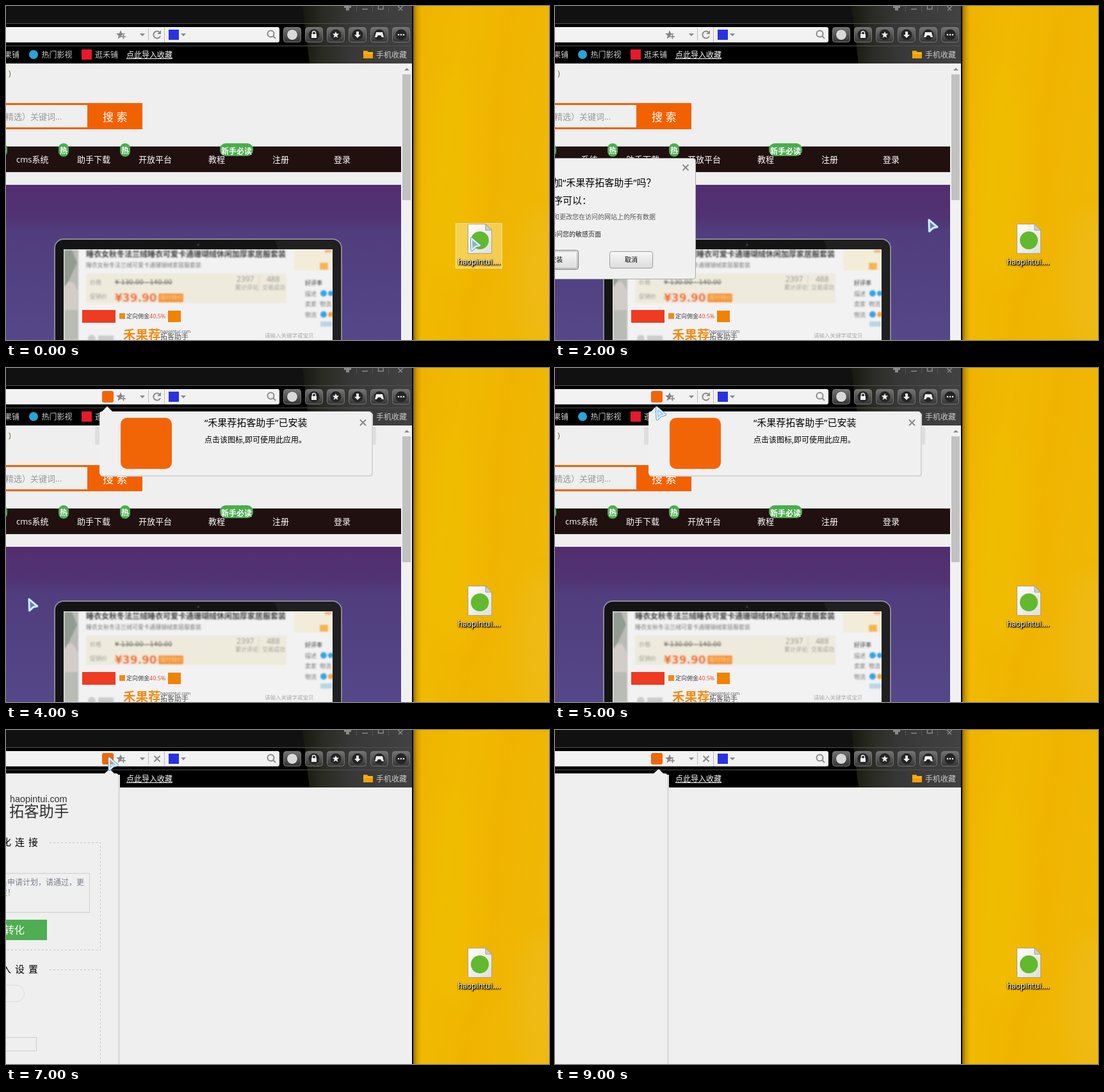
Recreate the animation shown at these times as an HTML page. Size 848 by 523 pixels, loop 10000 ms.

```html
<!DOCTYPE html>
<html lang="zh-CN">
<head>
<meta charset="utf-8">
<title>拖放安装扩展</title>
<style>
html, body { margin: 0; width: 100%; height: 100%; overflow: hidden; background: #f0b400; }
svg { display: block; font: 12px 'Open Sans', 'Noto Sans CJK SC', 'Noto Sans CJK', sans-serif; }
.line { fill: none; stroke: #8a8a8a; stroke-width: 2; }
.dash { fill: none; stroke: #c4c4c4; stroke-dasharray: 3 3; }
.t9 { font-size: 9px; }
.t10 { font-size: 10px; }
.t13 { font-size: 13px; }
.t15 { font-size: 15px; }
.spaced { font-size: 15px; letter-spacing: 6px; }
.centred { font-family: 'Noto Sans CJK TC', sans-serif; }
.label { fill: #fff; text-anchor: middle; text-shadow: 1px 1px 1px #000, 1px 1px 2px #000, 0 1px 3px #000; }
</style>
</head>
<body>
<svg width="848" height="523" viewBox="0 0 848 523">
<defs>
  <linearGradient id="desk" x2="1" y2=".35">
    <stop stop-color="#efb200"/><stop offset=".35" stop-color="#f0ba00"/>
    <stop offset=".65" stop-color="#f0b400"/><stop offset="1" stop-color="#efb706"/>
  </linearGradient>
  <linearGradient id="edge"><stop stop-color="#4a3500" stop-opacity=".6"/><stop offset=".4" stop-color="#7a5800" stop-opacity=".3"/><stop offset="1" stop-color="#a07000" stop-opacity="0"/></linearGradient>
  <linearGradient id="sheen">
    <stop stop-color="#17190f"/><stop offset=".2" stop-color="#2b2c25"/><stop offset=".45" stop-color="#383838"/><stop offset="1" stop-color="#424242"/>
  </linearGradient>
  <linearGradient id="key" x2="0" y2="1"><stop stop-color="#747474"/><stop offset="1" stop-color="#343434"/></linearGradient>
  <linearGradient id="banner" x2="0" y2="1">
    <stop stop-color="#522e6f"/><stop offset=".2" stop-color="#513273"/><stop offset=".3" stop-color="#503d7d"/><stop offset="1" stop-color="#554789"/>
  </linearGradient>
  <linearGradient id="button" x2="0" y2="1"><stop stop-color="#f8f8f8"/><stop offset="1" stop-color="#dcdcdc"/></linearGradient>
  <linearGradient id="paper" x2="1" y2="1"><stop stop-color="#fff"/><stop offset="1" stop-color="#dedede"/></linearGradient>
  <filter id="soft"><feGaussianBlur stdDeviation="1"/></filter>
  <filter id="haze" x="-50%" y="-50%" width="200%" height="200%"><feGaussianBlur stdDeviation="14"/></filter>
  <clipPath id="screen"><rect x="90" y="381" width="420" height="142"/></clipPath>
  <g id="file">
    <path d="M721.5 341.5H749L758.5 351V387.5H721.5Z" fill="url(#paper)" stroke="#aaa27c"/>
    <path d="M749 341.5V351H758.5Z" fill="#cfcfcf" stroke="#999"/>
    <circle cx="740" cy="367" r="14" fill="#62b92e"/>
    <text class="label" x="739" y="405">haopintui....</text>
  </g>
  <path id="cross" class="line" d="M-4.5-4.5L4.5 4.5M4.5-4.5L-4.5 4.5"/>
  <path id="star" d="M0-7L2-2.2 7-2 3 1.4 4.5 6.5 0 3.6-4.5 6.5-3 1.4-7-2-2-2.2Z"/>
  <path id="down" d="M-4-2H4L0 2.5Z" fill="#8a8a8a"/>
  <path id="arrow" d="M1 2L14 13 7.5 14.500 1.500 20Z" stroke-linejoin="round"/>
</defs>

<!-- desktop -->
<rect x="634" width="214" height="523" fill="url(#desk)"/>
<g filter="url(#haze)" opacity=".5">
  <ellipse cx="700" cy="270" rx="40" ry="170" fill="#f0c000"/>
  <ellipse cx="835" cy="430" rx="35" ry="110" fill="#efbd22"/>
</g>
<rect x="636" width="13" height="523" fill="url(#edge)"/>
<rect data-scenes="0" x="702.5" y="340.5" width="72" height="70" fill="#fff" fill-opacity=".32" stroke="#f4e3a6"/>
<use href="#file"/>

<!-- browser -->
<rect width="636" height="523"/>
<rect width="634" height="27" fill="#111"/>
<path d="M463 0H634V90H474Z" fill="url(#sheen)"/>
<path d="M0 27.5H634M0 62.5H634" stroke="#505050"/>
<path d="M547.5 0V9M572.5 0V9M597.5 0V9" stroke="#555"/>
<path d="M528 0H539V3H536V7H531V3H528Z" fill="#888"/>
<path d="M556 5H565M581.500 0V5H589V0M612 0L616 4 620 0M613 7L616 4 619 7" fill="none" stroke="#888" stroke-width="1.500"/>

<path d="M0 33H424Q427 33 427 36V54Q427 57 424 57H0Z" fill="#f2f2f2"/>
<rect data-scenes="456789" x="150" y="36" width="18" height="18" rx="3" fill="#f26507"/>
<use href="#star" x="179" y="45" fill="#858585"/>
<path d="M180 48H187M183.500 44.500V51.500" stroke="#f2f2f2" stroke-width="4"/>
<path d="M180 48H187M183.500 44.500V51.500" stroke="#858585" stroke-width="1.600"/>
<use href="#down" x="213" y="45"/>
<path d="M222.500 35V54M247.500 33V57" stroke="#bbb"/>
<g data-scenes="012345">
  <path class="line" d="M240.500 42A5.500 5.500 0 1 0 241 47"/>
  <path d="M242 38V44H236Z" fill="#8a8a8a"/>
</g>
<use data-scenes="6789" href="#cross" x="236" y="45"/>
<rect x="254" y="37" width="16" height="16" fill="#2932e1"/>
<use href="#down" x="277" y="45"/>
<circle class="line" cx="413.500" cy="43.500" r="5"/>
<path class="line" d="M417 47L421 51" stroke-width="3"/>
<g id="keys"></g>
<circle cx="447" cy="45" r="8" fill="#d8d8d8"/>
<g fill="#eee">
  <rect x="477" y="44" width="8" height="6"/>
  <path d="M478.500 44V42A2.500 2.500 0 0 1 483.500 42V44" fill="none" stroke="#eee" stroke-width="1.500"/>
  <use href="#star" transform="translate(515 45) scale(.75)"/>
  <path d="M547 40H551V45H554L549 50 544 45H547Z"/>
  <path d="M578 41H588L590 49 587 49 585 46H581L579 49 576 49Z"/>
  <circle cx="613" cy="45" r="1.300"/><circle cx="617" cy="45" r="1.300"/><circle cx="621" cy="45" r="1.300"/>
</g>

<g fill="#ccc">
  <text x="-3" y="81">果铺</text>
  <circle cx="43" cy="76" r="7" fill="#26a5d8"/>
  <text x="55.500" y="81">热门影视</text>
  <rect x="118" y="68" width="16" height="16" rx="1" fill="#e8192c"/>
  <text x="139" y="81">逛禾铺</text>
  <text x="188" y="81" fill="#fff">点此导入收藏</text>
  <path d="M188 82.500H260" stroke="#fff"/>
  <path d="M558 70H564L566 72H573V82H558Z" fill="#f5a000"/>
  <path d="M558 74H573" stroke="#ffcf55"/>
  <text x="578" y="81">手机收藏</text>
</g>

<rect y="90" width="634" height="433" fill="#efefef"/>
<g data-scenes="012345">
  <rect x="617" y="90" width="17" height="433" fill="#f1f1f1"/>
  <path d="M622 101H630L626 97Z" fill="#888"/>
  <rect x="619" y="107" width="13" height="197" fill="#c1c1c1"/>
  <text x="4" y="110" fill="#76602c">)</text>
  <rect y="152" width="213" height="41" fill="#f26100"/>
  <rect y="155" width="127" height="35" fill="#efefef"/>
  <text class="t13" x="-1" y="178" fill="#999">精选<tspan class="centred">）</tspan>关键词...</text>
  <text x="151" y="180" font-size="17" fill="#fff">搜 索</text>
  <rect y="220" width="617" height="40" fill="#211010"/>
  <path d="M0 260.500H617" stroke="#d8d8d8"/>
  <g id="nav" class="t13" fill="#fff"></g>
  <g fill="#4aad4e">
    <rect x="-14" y="215" width="16" height="21" rx="8"/><rect x="82" y="215" width="16" height="21" rx="8"/>
    <rect x="178" y="215" width="16" height="21" rx="8"/><rect x="334" y="215" width="52" height="20" rx="9"/>
  </g>
  <g fill="#fff" font-weight="bold">
    <text x="84" y="231">热</text><text x="180" y="231">热</text><text x="336" y="232">新手必读</text>
  </g>

  <rect y="280" width="617" height="243" fill="url(#banner)"/>
  <rect x="76" y="365" width="448" height="180" rx="14" fill="#141414" stroke="#8d8799" stroke-width="2"/>
  <path d="M420 367H510Q522 367 522 380V523H510V381H425Z" fill="#202020"/>
  <circle cx="300" cy="374" r="2" fill="#333"/>
  <rect x="90" y="381" width="420" height="142" fill="#f2f2f2"/>
  <g clip-path="url(#screen)"><g filter="url(#soft)">
    <rect x="91" y="382" width="22" height="141" fill="#b9bbb5"/>
    <path d="M91 382H103L111 402 98 430 91 440Z" fill="#929b92"/>
    <path d="M92 440Q102 420 112 446V476H92Z" fill="#d3cdca"/>
    <rect x="125" y="419" width="313" height="46" fill="#eeeadc"/>
    <rect x="450" y="382" width="60" height="32" fill="#f2ecd9"/>
    <text x="125" y="393" font-weight="bold" fill="#444">睡衣女秋冬法兰绒睡衣可爱卡通珊瑚绒休闲加厚家居服套装</text>
    <text class="t9" x="125" y="409" fill="#777">睡衣女秋冬法兰绒可爱卡通珊瑚绒家居服套装</text>
    <g class="t9" fill="#999">
      <text x="131" y="436">价格</text><text x="131" y="458">促销价</text>
      <text x="358" y="444">累计评论</text><text x="400" y="444">交易成功</text>
    </g>
    <g style="font-family:'DejaVu Sans',sans-serif">
      <text class="t10" x="170" y="436" fill="#555" text-decoration="line-through">¥ 130.00 - 140.00</text>
      <text x="170" y="463" font-size="17" font-weight="bold" fill="#f46a18">¥39.90</text>
    </g>
    <rect x="238" y="450" width="39" height="14" rx="2" fill="#f59228"/>
    <text class="t9" x="240" y="460" fill="#fbd3a0">限时特价</text>
    <text x="360" y="432" fill="#888">2397</text><text x="407" y="432" fill="#888">488</text>
    <path d="M395 421V447" stroke="#d8d1c2"/>
    <rect x="490" y="402" width="13" height="11" fill="#f7b548"/>
    <rect x="498" y="382" width="10" height="4" fill="#f2ad78"/>
    <g class="t9" fill="#777">
      <text x="467" y="437" fill="#333">好评率</text><text x="467" y="454">描述</text>
      <text x="467" y="470">卖家</text><text x="490" y="470">物流</text><text x="467" y="487">物流</text>
    </g>
    <g fill="#35a4e6">
      <circle cx="496" cy="450" r="5"/><circle cx="507" cy="450" r="4"/><circle cx="496" cy="483" r="5"/>
      <circle cx="507" cy="483" r="4" fill="#f4a43c"/>
    </g>
    <rect x="491" y="494" width="18" height="8" fill="#b9d6e5"/>
    <circle cx="134" cy="521" r="6" fill="#ccc"/><path d="M144 520H168" stroke="#ccc" stroke-width="8"/>
  </g></g>
  <rect x="119" y="476" width="52" height="20" fill="#ee3b22"/>
  <rect x="177" y="481" width="9" height="9" fill="#f08a1c"/>
  <text class="t9" x="188" y="489" fill="#444">定向佣金</text>
  <text class="t9" x="224" y="489" fill="#e8402a">40.5%</text>
  <rect x="253" y="477" width="20" height="18" fill="#f08300"/>
  <text x="183" y="522" font-size="19.500" font-weight="bold" fill="#f38b14">禾果荐</text>
  <text x="241" y="512" font-size="7" fill="#555">haopintui.com</text>
  <text x="241" y="522" font-size="11" fill="#555">拓客助手</text>
  <text x="404" y="519" font-size="8.500" fill="#aaa">请输入关键字或宝贝</text>
</g>

<!-- confirm dialog -->
<g data-scenes="2">
  <rect x="-10" y="238.500" width="229.500" height="189" rx="4" fill="#f0f0f0" stroke="#aaa"/>
  <use href="#cross" x="204" y="253"/>
  <text class="t15" x="-3" y="282">加“禾果荐拓客助手”吗<tspan class="centred">？</tspan></text>
  <text class="t15" x="-3" y="310">序可以<tspan class="centred">：</tspan></text>
  <text class="t10" x="-3" y="334" fill="#555">和更改您在访问的网站上的所有数据</text>
  <text class="t10" x="-8" y="361" fill="#222">访问您的敏感页面</text>
  <g fill="url(#button)" stroke="#999">
    <rect x="-32" y="382.500" width="68.500" height="30" rx="3" stroke="#777"/>
    <rect x="85.500" y="384.500" width="67" height="26" rx="3"/>
  </g>
  <path d="M0 384.500H34.500V410.500H0" fill="none" stroke="#777" stroke-dasharray="1 1"/>
  <text class="t10" x="-8" y="401">安装</text><text class="t10" x="109" y="401">取消</text>
</g>

<!-- installed notice -->
<g data-scenes="45">
  <path d="M139 92H146V120H139ZM573 92H578V120H573Z" fill="#dedede"/>
  <rect x="147" y="70" width="426" height="100" rx="4" fill="#d6d6d6"/>
  <path d="M150 68L158 60 166 68H567Q571 68 571 72V164Q571 168 567 168H150Q146 168 146 164V72Q146 68 150 68Z" fill="#f0f0f0"/>
  <rect x="179" y="78" width="80" height="80" rx="10" fill="#f26507"/>
  <use href="#cross" x="557.500" y="85.500"/>
  <text class="t15" x="310" y="91">“禾果荐拓客助手”已安装</text>
  <text x="310" y="117">点击该图标,即可使用此应用。</text>
</g>

<!-- extension panel -->
<g data-scenes="789">
  <rect y="70" width="178" height="453" fill="#ddd"/>
  <path d="M0 68H154L162 61 169 68H172Q175 68 175 71V523H0Z" fill="#efefef"/>
  <g data-scenes="78">
    <text x="6" y="113" font-size="14.400" fill="#333" style="font-family:'Liberation Sans',sans-serif">haopintui.com</text>
    <text x="5" y="136" font-size="23.300" font-weight="300" fill="#333">拓客助手</text>
    <path class="dash" d="M68 176.500H147.500V344.500H0M68 375.500H147.500V523"/>
    <text class="spaced" x="-28" y="181">转化连接</text>
    <text class="spaced" x="-28" y="380">导入设置</text>
    <g fill="none" stroke="#ccc">
      <rect x="-10" y="224.500" width="140.500" height="61"/>
      <rect x="-40" y="399.500" width="68.500" height="26" rx="13" stroke="#ddd"/>
      <rect x="-10" y="481.500" width="57.500" height="21"/>
      <path d="M0 407V418"/>
    </g>
    <g fill="#777f8c">
      <text x="-10" y="243">员申请计划<tspan class="centred">，</tspan>请通过<tspan class="centred">，</tspan>更</text>
      <text x="-10" y="259">佳<tspan class="centred">！</tspan></text>
    </g>
    <rect y="297" width="64" height="32" fill="#4fae51"/>
    <text x="-3" y="319" font-size="16" fill="#fff">转化</text>
    <text class="t10" x="-5" y="496" fill="#4b8bc4">0</text>
  </g>
</g>

<use data-scenes="1" href="#file" transform="translate(-142 -28)" opacity=".6"/>
<g id="cursor">
  <use href="#arrow" fill="none" stroke="#4f8cc4" stroke-width="4"/>
  <use href="#arrow" fill="#bfe0f5" fill-opacity=".35" stroke="#d9effc" stroke-width="2.400"/>
</g>
</svg>
<script>
const byId = id => document.getElementById(id);

byId('keys').innerHTML = Array.from({ length: 6 }, (_, i) => {
  const x = 433 + 34 * i;
  return `<rect x="${x + .5}" y="33.5" width="27" height="23" rx="4" fill="url(#key)" stroke="#777"/>
    <circle cx="${x + 14}" cy="45" r="8.5" fill="#242424"/>`;
}).join('');

const navItems = { cms系统: 16, 助手下载: 111, 开放平台: 207, 教程: 316, 注册: 416, 登录: 512 };
byId('nav').innerHTML = Object.entries(navItems)
  .map(([name, x]) => `<text x="${x}" y="245">${name}</text>`).join('');

const SCENE_MS = 1000;
const pointerTips = [[726, 362], [584, 334], [583, 333], [-3, 388], [35, 360],
  [158, 60], [160, 42], [160, 42], [1, 420], [-40, 420]];
const parts = document.querySelectorAll('[data-scenes]');
const start = performance.now();

function draw() {
  const scene = Math.floor((performance.now() - start) / SCENE_MS) % pointerTips.length;
  for (const part of parts)
    part.style.display = part.dataset.scenes.includes(scene) ? '' : 'none';
  byId('cursor').setAttribute('transform', `translate(${pointerTips[scene]})`);
  requestAnimationFrame(draw);
}
draw();
</script>
</body>
</html>
```
